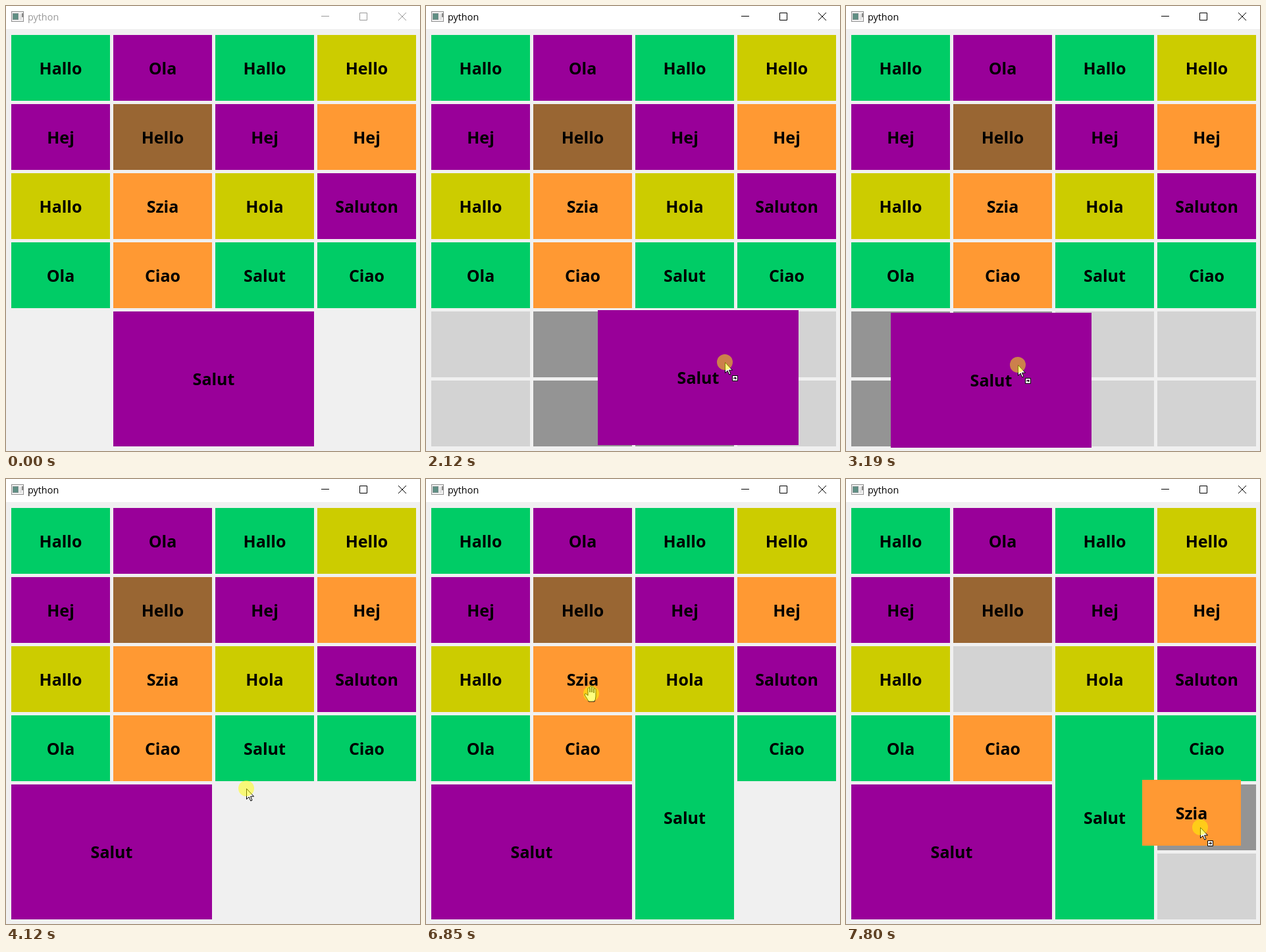
Write an HTML page that moves like this. It is 629 px wide and 676 px high and loops after 8 s.

```html
<!DOCTYPE html>
<html lang="en">
<head>
<meta charset="utf-8">
<title>python</title>
<style>
html, body { margin: 0; width: 100%; height: 100%; overflow: hidden; background: #f0f0f0; }
svg { display: block; }
.label { font: bold 25px "Noto Sans", "Open Sans", sans-serif; text-anchor: middle; }
.title { font: 14.4px "Open Sans", "Noto Sans", sans-serif; }
.pointer path { fill: #fff; stroke: #000; stroke-linejoin: round; }
</style>
</head>
<body>
<svg width="629" height="676" viewBox="0 0 629 676">
  <rect width="629" height="676" fill="#f0f0f0"/>
  <rect width="629" height="35" fill="#fff"/>
  <rect x="8.5" y="8.5" width="18" height="15" fill="#f4f4f4" stroke="#8d8d8d"/>
  <rect x="10.5" y="11.5" width="8" height="9" fill="#5f8f84" stroke="#7b8f8d"/>
  <rect x="20" y="12" width="4" height="9" fill="#e2e2e2"/>
  <rect x="24" y="11" width="2" height="6" fill="#888"/>
  <text id="title" class="title" x="33" y="22">python</text>
  <path id="buttons" d="M479 15.5h12M537.5 10.5h11v11h-11zM596 10l12 12M608 10l-12 12" fill="none"/>
  <g id="cells"></g>
  <g id="tiles"></g>
  <g id="pointer" class="pointer">
    <path id="hand" d="M-4 12C-5 9-10 3-10 1q1-2 3 0l2 2V-8q1.5-2 3 0V-2V-10q1.5-2 3 0V-2V-9.5q1.5-2 3 0V-1V-7q1.5-2 3 0V4Q7 8 5 12Z"/>
    <path id="resize" d="M0-11.5L5-6.5H1.5V6.5H5L0 11.5L-5 6.5H-1.5V-6.5H-5Z"/>
    <path id="arrow" d="M.5 .5V16.5L4.2 13L6.8 19L9 18L6.5 12.2H11.5Z"/>
    <path id="badge" d="M11.5 20.5h8v8h-8zM13 24.5h4.5l-2-2m2 2l-2 2"/>
    <circle r="12" fill="#ff0" fill-opacity=".5"/>
  </g>
</svg>
<script>
const LOOP = 8000, STEP = 78;
const COLORS = { g: '#00cc66', p: '#990099', y: '#cccc00', o: '#ff9933', b: '#996633' };
const PAINT = 'gpgypbpoyoypgogg';
const WORDS = 'Hallo Ola Hallo Hello Hej Hello Hej Hej Hallo Szia Hola Saluton Ola Ciao Salut Ciao'.split(' ');

const ENTRY = { x: 556, y: 677 };
const MOVES = [
  { from: 930, to: 1470, x: 356, y: 543, power: 1.5 },
  { from: 1640, to: 2420, x: 490, y: 540, power: 1.3 },
  { from: 2500, to: 2600, x: 496, y: 545, power: 1 },
  { from: 2750, to: 3350, x: 249, y: 545, power: 2 },
  { from: 3730, to: 4280, x: 382, y: 459, power: 1.5 },
  { from: 4660, to: 4660, x: 383, y: 458, power: 1 },
  { from: 4830, to: 5620, x: 386, y: 645, power: 1.6 },
  { from: 6170, to: 6850, x: 251, y: 326, power: 1.5 },
  { from: 6950, to: 7800, x: 538, y: 529, power: 1.3 }
];

const $ = id => document.getElementById(id);
const left = col => 8 + 155 * col;
const topOf = row => 44 + 105 * row;
const span = (n, size) => n * (size + 5) - 5;
const show = (el, on) => el.setAttribute('visibility', on ? 'visible' : 'hidden');
const within = (t, a, b) => t >= a && t < b;
const covers = (area, col, row) =>
  within(col, area.col, area.col + area.w) && within(row, area.row, area.row + area.h);

function add(parent, tag, attrs = {}) {
  const el = document.createElementNS('http://www.w3.org/2000/svg', tag);
  for (const k in attrs) el.setAttribute(k, attrs[k]);
  return parent.appendChild(el);
}

function makeTile(color, word, col, row, w = 1, h = 1) {
  const g = add($('tiles'), 'g');
  const rect = add(g, 'rect', { fill: COLORS[color] });
  const text = add(g, 'text', { class: 'label' });
  text.textContent = word;
  const tile = { col, row, w, h, g, rect, text };
  place(tile);
  return tile;
}

function place(tile, x = left(tile.col), y = topOf(tile.row)) {
  const w = span(tile.w, 150), h = span(tile.h, 100);
  tile.rect.setAttribute('width', w);
  tile.rect.setAttribute('height', h);
  tile.text.setAttribute('x', w / 2);
  tile.text.setAttribute('y', Math.floor(h / 2) + 10);
  tile.g.setAttribute('transform', `translate(${x} ${y})`);
}

const tiles = WORDS.map((word, i) => makeTile(PAINT[i], word, i % 4, i >> 2));
const tall = tiles[14], small = tiles[9];
const big = makeTile('p', 'Salut', 1, 4, 2, 2);
tiles.push(big);
$('tiles').append(small.g);

const DRAGS = [
  { tile: big, from: 1640, to: 3580, x: 193, y: 79, grabCol: 1 },
  { tile: small, from: 6950, to: LOOP, x: 88, y: 72, grabCol: 0 }
];

const cells = Array.from({ length: 24 }, (_, i) => {
  const col = i % 4, row = i >> 2;
  const el = add($('cells'), 'rect', { x: left(col), y: topOf(row), width: 150, height: 100 });
  return { col, row, el };
});

// The screen refreshes in even steps during each move.
function pointerAt(t) {
  let { x, y } = ENTRY;
  for (const m of MOVES) {
    if (t < m.from) break;
    const count = Math.round((m.to - m.from) / STEP) + 1;
    const k = Math.min(1, (Math.round((t - m.from) / STEP) + 1) / count);
    const eased = 1 - (1 - k) ** m.power;
    x += (m.x - x) * eased;
    y += (m.y - y) * eased;
  }
  return [Math.round(x), Math.round(y)];
}

function cursorKind(t, dragging, overTile) {
  if (dragging || within(t, 3580, 3730)) return 'arrow';
  if (within(t, 4280, 6170)) return 'resize';
  return overTile ? 'hand' : 'arrow';
}

function draw(t) {
  const [x, y] = pointerAt(t);
  const col = Math.floor((x - 8) / 155), row = Math.floor((y - 44) / 105);
  const drag = DRAGS.find(d => within(t, d.from, d.to));
  const moving = drag && drag.tile;
  const editing = drag || within(t, 4660, 5850);

  const ink = t < 1470 ? '#999' : '#000';
  $('title').setAttribute('fill', ink);
  $('buttons').setAttribute('stroke', ink);

  big.col = t < 3580 ? 1 : 0;
  tall.h = t < 5850 ? 1 : 3;
  [big, tall, small].forEach(tile => place(tile));
  if (drag) place(moving, x - drag.x, y - drag.y);

  const goal = drag && { col: col - drag.grabCol, row, w: moving.w, h: moving.h };
  for (const c of cells) {
    const taken = tiles.some(tile => tile !== moving && covers(tile, c.col, c.row));
    show(c.el, editing && !taken);
    c.el.setAttribute('fill', goal && covers(goal, c.col, c.row) ? '#949494' : '#d3d3d3');
  }

  const kind = cursorKind(t, drag, tiles.some(tile => covers(tile, col, row)));
  for (const id of ['hand', 'arrow', 'resize'])
    $(id).style.display = id === kind ? '' : 'none';
  $('badge').style.display = drag ? '' : 'none';
  show($('pointer'), t >= 460);
  $('pointer').setAttribute('transform', `translate(${x} ${y})`);
}

const start = performance.now();
function tick() {
  draw((performance.now() - start) % LOOP);
  requestAnimationFrame(tick);
}
tick();
</script>
</body>
</html>
```
